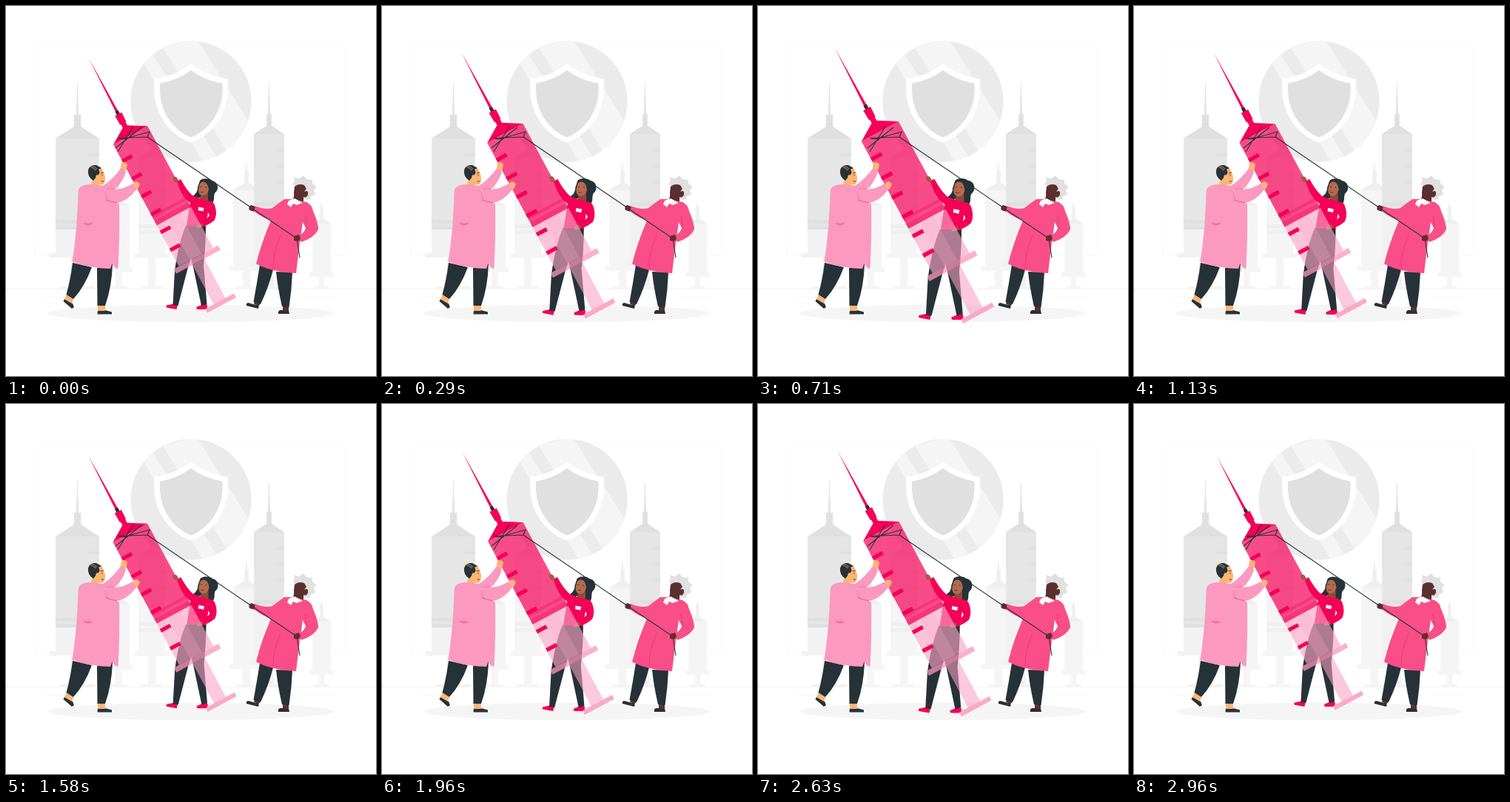
An HTML page that plays this animation: 500 by 500 pixels, repeating every 3000 ms.

```html
<!DOCTYPE html>
<html lang="en">
<head>
<meta charset="utf-8">
<title>Raising the syringe</title>
<style>
html, body { margin: 0; width: 100%; height: 100%; overflow: hidden; background: #fff; }
svg { display: block; width: 100%; height: 100%; }
</style>
</head>
<body>
<svg viewBox="0 0 500 500">
  <defs><clipPath id="disc"><circle cx="250" cy="129" r="81.7"/></clipPath></defs>

  <path d="M39 55H457V337H39Z" fill="none" stroke="#fafafa"/>
  <path d="M0 382.3H500" stroke="#efefef" stroke-width=".7"/>
  <path d="M53 393.5H92M330 389H352M400 394H446" stroke="#f4f4f4" stroke-width=".7"/>
  <g id="backdrop"></g>

  <g clip-path="url(#disc)">
    <circle cx="250" cy="129" r="82" fill="#ebebeb"/>
    <path d="M186 78L198 65L286 206L268 214ZM211 55L258 45L332 162L298 196Z" fill="#f5f5f5"/>
  </g>
  <path d="M250 78Q228 95 200 98.500V111C200 145 220 174 250 184.500C280 174 300 145 300 111V98.500Q272 95 250 78Z" fill="#fff"/>
  <path d="M250 87Q231 101 208 104.500V113C208 143 226 168 250 177.500C274 168 292.500 143 292.500 113V104.500Q269 101 250 87Z" fill="#e0e0e0"/>

  <ellipse cx="249.500" cy="415.500" rx="193.500" ry="11.800" fill="#f5f5f5"/>

  <g id="pulse">
    <g id="woman">
      <path d="M217 404.500L229 402L232 404L230.500 410L217 407.500Q215.500 406 217 404.500ZM258 406.500L269 402L272 404V410H259Q256 409 258 406.500Z" fill="#f50057"/>
      <path d="M243 297L270 297Q270 325 267 350L271.500 403L264 405L253 353L250 341L246 353L232.500 405L225.500 404L228 358Q233 320 243 297Z" fill="#263238"/>
      <path d="M262 236C266 232 275 233 278 236C286 237 288 246 284 251C279 254 283 262 279 266C274 270 268 267 266 262L262 259Q256 261 252 257Q259 253 259 245Z" fill="#263238"/>
      <path d="M264 252L273 252L273 263Q268 267 262 261Z" fill="#8f4b38"/>
      <path d="M262 240Q268 234 273 239L274 248Q272 256 266 256Q260 256 260 248Z" fill="#b5694f"/>
      <path d="M263 238Q272 235 274 247Q278 246 277 252L282 246L276 235L266 234Z" fill="#263238"/>
      <path d="M262.500 244.500L264.500 244M269 244.500L271 245M263 251Q265 252.500 267 251" stroke="#263238" stroke-width=".8" fill="none"/>
      <path d="M231 237L236 234Q244 249 252 256L262 260L272 263Q280 263 282 269Q286 280 282 289Q276 295 266 298L263 294Q271 289 275 283L273 279L270 298L244 297L249 266Q237 258 231 237Z" fill="#f50057"/>
      <path d="M274.500 272L276 282L271 291" stroke="#c8004b" stroke-width=".6" fill="none"/>
      <path d="M260 271.500L267.500 273L266.500 277.500L259.500 276Z" fill="#fff"/>
      <path d="M265 293L258 295Q256 298 259 300L266 298Z" fill="#a65b40"/>
    </g>
    <g transform="translate(112 71) rotate(-28.300)">
      <path d="M0 0L1.200 82H-2.400Z" fill="#f50057"/>
      <path d="M-2.900 80H1.700V87H-2.900Z" fill="#263238"/>
      <path d="M-5.700 85H4.500L4 99H3V104L26.500 118H-26L-4 104V99H-5.200Z" fill="#f50057"/>
      <path d="M-26 118H26.500V242H-26Z" fill="#f50057" opacity=".7"/>
      <path d="M-26 227H26.500V231H-26ZM-26 235H26.500V242H-26Z" fill="#f50057" opacity=".3"/>
      <path d="M-26 242H26.500V305H-26Z" fill="#faa3c4" opacity=".64"/>
      <path d="M-9 242H9V305H-9Z" fill="#faa3c4" opacity=".25"/>
      <path d="M-9 312H9V373H-9Z" fill="#faa3c4" opacity=".58"/>
      <path d="M-34 305H34V312H-34Z" fill="#fa96ba" opacity=".75"/>
      <path d="M-22 372.500H22V378.500H-22Z" fill="#fba9c7"/>
      <g id="marks"></g>
    </g>
    <path d="M225 232Q228 229 231 232L233 236L230 238Q226 238 225 232Z" fill="#a65b40"/>
  </g>

  <g fill="none" stroke="#263238" stroke-width="1.100">
    <path d="M151 178.500L191 177L194 170L158 180L151 178.500M148 192L183 164M151 197L172 163M191 177L332 273"/>
  </g>

  <g id="leftMan">
    <path d="M79 396L90 402L92 407L89 409L77.500 399ZM124 411H134L143 413.500V416.500H123.500Z" fill="#263238"/>
    <path d="M82 390L91 396L89 402L79 396ZM124 403H134V412H124Z" fill="#ffb573"/>
    <path d="M90 347L116 353Q106 380 91 396L81.500 390Q87 370 90 347ZM123 354L144 348Q143 380 134 405H123.500Z" fill="#263238"/>
    <path d="M111 221Q114 214 122 216Q131 217 132 226Q136 232 133 239Q131 243 126 241Q124 245 114 243L117 235Q111 229 111 221Z" fill="#ffb573"/>
    <path d="M111 222Q113 214 122 215L129 219L125 221Q128 225 125 228L122 231L118 236Q110 231 111 222Z" fill="#263238"/>
    <path d="M114 217L122 222M116 216L123 220" stroke="#ffb573" stroke-width=".7"/>
    <circle cx="123.500" cy="230.500" r="2.200" fill="#ffb573"/>
    <path d="M128 226L132 225M130 228V229.500M129 237H132" stroke="#263238" stroke-width=".9"/>
    <path d="M155 218L156 212Q161 209 164 214L163 220L160 224ZM171 244L173 238Q179 236 181 241L178 247L174 249Z" fill="#ffb573"/>
    <path d="M99 246Q104 241 115 241L131 243Q145 234 156 218L162 224Q158 238 147 248Q160 247 171 240L176 248Q164 264 150 266L153 268Q154 310 151.500 355Q145 354 144 347L141 355Q113 354.500 89.500 345.500Q96 305 97.500 255Q97.500 249 99 246Z" fill="#fb99bf"/>
    <path d="M136 247L147 247M134 262L150 266L137 263L134 252" stroke="#f45f96" stroke-width=".7" fill="none"/>
    <path d="M103 292.500Q110 294.500 117 293Q114 297.500 108 296Z" fill="#f8689d"/>
  </g>

  <g id="rightMan">
    <path d="M327 401L338 404L342 403L341 409L325 405Q324 402 327 401ZM370 411H382L383 416H368Q367 413 370 411Z" fill="#263238"/>
    <path d="M336 398L344 401L342 405L335 403ZM374 404H382V412H374Z" fill="#5c2f2f"/>
    <path d="M343 350L361 356Q355 380 344 403L334.500 400Q339 375 343 350ZM365 359L387 360Q386 384 382.500 407L373 406Q367 380 365 359Z" fill="#263238"/>
    <path d="M388 241L390 234L388 231L396 233L402 229L406 234L414 235L414 240L420 245L416 248L418 255L412 257L410 262L400 261L394 246Z" fill="#e0e0e0"/>
    <path d="M390 244Q395 239 403 242L406 247L403 251Q409 248 408 255Q406 260 402 258L402 266L391 268L386 262Q390 260 389 252Z" fill="#5c2f2f"/>
    <path d="M391 248L393 246.500M391 250.500V252M389 258L392 258" stroke="#263238" stroke-width=".8"/>
    <path d="M337 271L331 269Q327 271 329 276L336 278ZM400 309L392 309Q387 312 389 317L396 319L400 315Z" fill="#5c2f2f"/>
    <path d="M337 270.500Q352 276 360 273Q369 266 376 261L386 261L406 265Q413 268 415 277Q422 293 422 302Q417 313 399 319L396 310Q403 307 405 300L401 292L397 320L392 361Q360 360 338 348.500Q345 320 358 290Q346 286 335 277.500Z" fill="#fa4e89"/>
    <path d="M382 263L390 260L401 266L393 269L388 267L385 272L380 268Z" fill="#fff"/>
    <path d="M404 284L407 301M371 310Q360 335 361 354" stroke="#df2b6b" stroke-width=".6" fill="none"/>
    <path d="M332 273L393 314L397 340" stroke="#263238" stroke-width="1.100" fill="none"/>
    <path d="M389 311L396 309L398 314L395 318L389 317Z" fill="#5c2f2f"/>
  </g>
</svg>
<script>
const LOOP = 3000;
const PIVOT = [208, 239];
// [time in ms, scale]
const KEYS = [
  [0, 1], [290, 1.045], [580, 1.087], [710, 1.082], [1130, 1.041], [1580, 1.008],
  [1690, 0.991], [2170, 1.060], [2290, 1.084], [2380, 1.087], [2710, 1.030],
  [2960, 0.994], [3000, 1]
];
const byId = id => document.getElementById(id);
const rect = (x, y, w, h, fill) =>
  `<rect x="${x}" y="${y}" width="${w}" height="${h}" fill="${fill}"/>`;

function backSyringe({ x, half, tip, top, bottom, foot, tones, marks = 0, stopper = 0 }) {
  const [light, mid, dark] = tones;
  const hub = top - half * 0.55;
  const neck = half * 0.16;
  const flange = half * 1.3;
  let out = `<path d="M${x} ${tip}L${x + 1.5} ${hub - 14}H${x - 1.5}Z" fill="${dark}"/>`;
  out += rect(x - neck, hub - 16, neck * 2, 18, dark);
  out += rect(x - half, top, half * 2, bottom - top, mid);
  out += `<path d="M${x - neck} ${hub}H${x + neck}L${x + half} ${top}H${x - half}Z" fill="${dark}"/>`;
  for (let i = 0; i < marks; i++) out += rect(x + half * 0.45, top + 20 + i * 21.5, half * 0.55, 4, dark);
  if (stopper) {
    out += rect(x - half, stopper, half * 2, bottom - stopper, light);
    out += rect(x - half, stopper - 13, half * 2, 5, dark) + rect(x - half, stopper - 5, half * 2, 5, dark);
  }
  out += rect(x - flange, bottom, flange * 2, 6, light);
  out += rect(x - half * 0.3, bottom + 6, half * 0.6, foot - bottom - 6, light);
  return out + rect(x - half * 0.8, foot, half * 1.6, 3, light);
}

const PALE = ['#f5f5f5', '#f5f5f5', '#efefef'];
const GREY = ['#f2f2f2', '#e6e6e6', '#e0e0e0'];
byId('backdrop').innerHTML = [
  { x: 152, half: 15, tip: 230, top: 270, bottom: 353, foot: 379, tones: PALE },
  { x: 197, half: 18, tip: 150, top: 205, bottom: 334, foot: 379, tones: PALE, marks: 3, stopper: 308 },
  { x: 325, half: 18, tip: 207, top: 249, bottom: 352, foot: 379, tones: PALE },
  { x: 426.5, half: 12.5, tip: 264, top: 294, bottom: 360, foot: 379, tones: PALE },
  { x: 355.5, half: 20.5, tip: 97, top: 173, bottom: 345, foot: 379, tones: GREY, marks: 3, stopper: 278 },
  { x: 96.5, half: 29.5, tip: 97, top: 179, bottom: 334, foot: 379, tones: GREY, marks: 4, stopper: 302 }
].map(backSyringe).join('');

byId('marks').innerHTML = Array.from({ length: 6 }, (_, i) =>
  rect(-26, 141 + i * 27.3, 15, 5.2, '#f50057')).join('');

function scaleAt(time) {
  const i = KEYS.findIndex(key => key[0] > time);
  const [t0, s0] = KEYS[i - 1];
  const [t1, s1] = KEYS[i];
  return s0 + (s1 - s0) * (time - t0) / (t1 - t0);
}

const pulse = byId('pulse');
function draw(time) {
  const s = scaleAt(time % LOOP);
  const [x, y] = PIVOT;
  pulse.setAttribute('transform', `translate(${x} ${y}) scale(${s}) translate(${-x} ${-y})`);
}

let start;
function tick(now) {
  start ??= now;
  draw(Math.max(0, now - start));
  requestAnimationFrame(tick);
}
draw(0);
requestAnimationFrame(tick);
</script>
</body>
</html>
```
